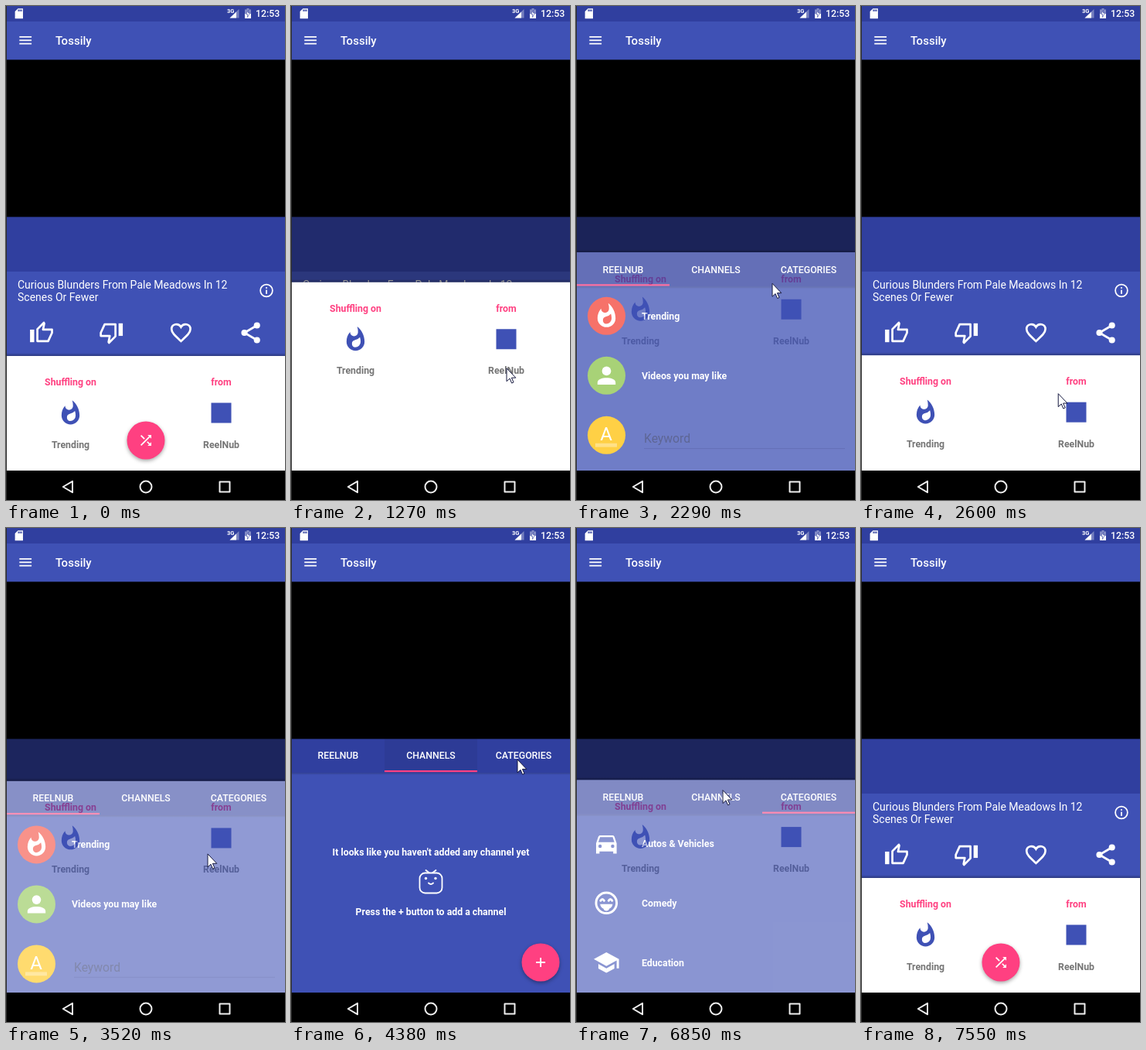
An HTML page for the animation above (8.1 s loop, 361 by 638 pixels).

```html
<!DOCTYPE html>
<html lang="en">
<head>
<meta charset="utf-8">
<title>Shuffle player</title>
<style>
  html, body { margin: 0; width: 100%; height: 100%; overflow: hidden; background: #000; }
  svg { display: block; width: 361px; height: 638px; }
  text { font-family: Roboto, "Noto Sans", sans-serif; font-size: 12.3px; fill: #fff; }
  .bold { font-weight: 700; }
  .medium { font-weight: 500; }
  .mid { text-anchor: middle; }
  .icon { fill: currentColor; fill-rule: evenodd; }
  .line { fill: none; stroke: currentColor; stroke-width: 2; }
  .round { stroke-linecap: round; stroke-linejoin: round; }
  .fab { filter: drop-shadow(0 2px 2.5px rgba(0, 0, 0, .35)); }
</style>
</head>
<body>
<svg id="stage" viewBox="0 0 361 638" xmlns="http://www.w3.org/2000/svg"></svg>
<script>
const INDIGO = '#3f51b5', DEEP = '#303f9f', PINK = '#ff4081';
const LOOP = 8100, TRAVEL = 180;

const rect = (x, y, w, h, fill = 'currentColor', more = '') =>
  `<rect x="${x}" y="${y}" width="${w}" height="${h}" fill="${fill}" ${more}/>`;
const disc = (x, y, r, fill = 'currentColor') => `<circle cx="${x}" cy="${y}" r="${r}" fill="${fill}"/>`;
const ring = (x, y, r) => `<circle class="line" cx="${x}" cy="${y}" r="${r}"/>`;
const shape = d => `<path d="${d}"/>`;
const line = (d, cls = '') => `<path class="line ${cls}" d="${d}"/>`;
const text = (s, x, y, cls = '', style = '') =>
  `<text x="${x}" y="${y}" class="${cls}" style="${style}">${s}</text>`;

// Icons on a 24-unit grid
const icons = {
  menu: [6, 11, 16].map(y => rect(3, y, 18, 2)).join(''),
  card: shape('M10 2H20V22H4V8zM10 4v4h2V4zM13 4v4h2V4zM16 4v4h2V4z'),
  thumb: rect(1, 9, 4, 12) + line('M8 8.6V20H18.3L22 12V9H13.4L14.6 3.2L14.2 2.4z', 'round'),
  heart: line('M12 20C6.5 15 3 12 3 8.5C3 3.6 9.5 2.3 12 6.5C14.5 2.3 21 3.6 21 8.5C21 12 17.5 15 12 20z'),
  share: disc(18, 5, 3) + disc(6, 12, 3) + disc(18, 19, 3) + line('M18 5L6 12L18 19'),
  info: ring(12, 12, 9) + rect(11, 7, 2, 2) + rect(11, 11, 2, 6),
  flame: shape('M13.5.7Q14.3 3.5 14.2 5.5C14.2 10.4 7.2 10.4 7.2 5.5Q4 9 4 14a8 8 0 0 0 16 0C20 8.6 17.4 3.8 13.5.7z' +
    'M11.7 19a3.2 3.2 0 0 1-.4-6.3Q14.4 12 15.9 10.1Q16.5 12 16.5 14.2A4.8 4.8 0 0 1 11.7 19z'),
  shuffle: line('M4.7 4.7l5.2 5.2M4.7 19.3L18.5 5.5M14 14l4.5 4.5') + shape('M14.5 4H20V9.5zM20 14.5V20H14.5z'),
  person: disc(12, 8, 4) + shape('M4 20V18C4 12.7 20 12.7 20 18V20z'),
  car: shape('M6 5h12l1 1l2 6v9h-3v-2H6v2H3v-9l2-6zM5 11h14l-1.500-4.500h-11z') +
    disc(6.5, 14.5, 1.5, INDIGO) + disc(17.5, 14.5, 1.5, INDIGO),
  grin: ring(12, 12, 9) + line('M7 10q1.500-2.500 3 0M14 10q1.500-2.500 3 0', 'round') +
    shape('M6.500 13H17.500Q17 16 14.500 17A2.600 2.600 0 0 1 9.500 17Q7 16 6.500 13z'),
  school: shape('M5 13.200v4L12 21l7-3.800v-4L12 17zM12 3L1 9l11 6 9-4.900V17h2V9z'),
  camera: shape('M3 6H17V10.500l4-4v11l-4-4V18H3z'),
  movie: shape('M2 4h3l2 4h3L8 4h2l2 4h3l-2-4h2l2 4h3l-2-4h4v16H2z'),
  pad: [0, 90, 180, 270].map(a => `<path d="M9 2h6v5.5l-3 3-3-3z" transform="rotate(${a} 12 12)"/>`).join('')
};

const icon = (name, x, y, size, color = '#fff', turn = 0) =>
  `<g class="icon" color="${color}"
    transform="translate(${x} ${y}) rotate(${turn}) scale(${size / 24}) translate(-12 -12)">${icons[name]}</g>`;
const fab = (id, x, y, art) =>
  `<g transform="translate(${x} ${y})"><g id="${id}"><g class="fab">${disc(0, 0, 24.5, PINK)}</g>${art}</g></g>`;
const rowY = i => 82 + 77 * i;

const statusBar = rect(0, 0, 361, 20, DEEP) + icon('card', 16.8, 9.7, 15.5) +
  text('3G', 286, 9, 'bold', 'font-size:7.5px') +
  '<g fill="#fff"><path d="M301.5 4V15.500H289.500z" opacity=".35"/><path d="M298 7.500V15.500H289.500z"/>' +
  '<path d="M309 4.500h2.500V3h3v1.500H317V16h-8z" opacity=".4"/></g>' + rect(309, 10, 8, 6, '#fff') +
  `<path d="M313.500 5.500l-3 5h2v4l3.200-5.500h-2.200z" fill="#fff" stroke="${DEEP}" stroke-width=".6"/>` +
  text('12:53', 323, 14, 'medium');

const toolbar = rect(0, 20, 361, 49.4, INDIGO) + icon('menu', 25.2, 44.3, 21) +
  text('Tossily', 64, 50, 'medium', 'font-size:15px');

const actions = ['thumb', 'thumb', 'heart', 'share']
  .map((name, i) => icon(name, 46 + 90.2 * i, 422, 32.5, '#fff', i === 1 ? 180 : 0)).join('');
const player = rect(0, 272, 361, 71, DEEP) + rect(0, 343, 361, 257, INDIGO) +
  text('Curious Blunders From Pale Meadows In 12', 15, 365, '', 'font-size:14px') +
  text('Scenes Or Fewer', 15, 381.4, '', 'font-size:14px') +
  icon('info', 337, 367.5, 21) + actions;

const column = (x, head, art, name) => text(head, x, 38.3, 'bold mid', 'fill:' + PINK) + art +
  text(name, x, 118.5, 'bold mid', 'fill:#757575');
const collapsed = rect(0, 0, 361, 330, '#fff') +
  column(83.5, 'Shuffling on', icon('flame', 83.5, 73.8, 35, INDIGO), 'Trending') +
  column(278.5, 'from', rect(265.5, 60.5, 26, 26, INDIGO), 'ReelNub');

const rowDisc = (i, color) => disc(39.5, rowY(i), 24.5, color);
const rowText = (i, s) => text(s, 85, rowY(i) + 4.3, 'bold');
const sources = rowDisc(0, '#f44336') + icon('flame', 39.5, rowY(0), 35) + rowText(0, 'Trending') +
  rowDisc(1, '#8bc34a') + icon('person', 39.5, rowY(1), 35) + rowText(1, 'Videos you may like') +
  rowDisc(2, '#ffc107') + text('A', 39, 243, 'mid', 'font-size:24px') + rect(25, 246.5, 28, 4.8, '#fff', 'opacity=".36"') +
  text('Keyword', 88, 246, '', 'font-size:15.7px;fill:#000;fill-opacity:.38') + rect(88, 252.8, 260, 1, DEEP);

const face = '<rect x="166.5" y="173.5" width="29" height="26" rx="7"/><path d="M178.5 173l-4-3M183.500 173l4-3M178 186.500q3 3 6 0"/>';
const channels = text("It looks like you haven't added any channel yet", 181, 151.3, 'bold mid') +
  text('Press the + button to add a channel', 181, 228, 'bold mid') +
  `<g class="line round" color="#fff" style="stroke-width:1.8">${face}</g>` +
  disc(174.5, 180.5, 1.7, '#fff') + disc(187, 180.5, 1.7, '#fff') +
  fab('plus', 323, 289, rect(-6, -1, 12, 2, '#fff') + rect(-1, -6, 2, 12, '#fff'));

const categories = Object.entries({
  car: 'Autos &amp; Vehicles', grin: 'Comedy', school: 'Education',
  camera: 'Entertainment', movie: 'Film &amp; Animation', pad: 'Gaming'
}).map(([art, name], i) => icon(art, 39.3, rowY(i) - .3, 35.5) + rowText(i, name)).join('');

const pages = [sources, channels, `<g id="list">${categories}</g>`]
  .map((page, i) => `<g transform="translate(${360 * i})">${page}</g>`).join('');
const tabs = ['REELNUB', 'CHANNELS', 'CATEGORIES']
  .map((s, i) => text(s, 61 + 120 * i, 26.4, 'medium mid')).join('');
const expanded = rect(0, 0, 361, 330, INDIGO) +
  `<g clip-path="url(#pageClip)"><g id="pages">${pages}</g></g>` +
  rect(0, 44, 361, 3, 'url(#drop)') + rect(0, 0, 361, 44, DEEP) + rect(121, 0, 120, 44, '#000', 'id="ripple"') +
  tabs + rect(1, 41, 120, 2.2, PINK, 'id="marker"');

const navBar = rect(0, 600, 361, 38, '#000') +
  `<g class="line round" color="#eee"><path d="M73.800 621L86 613.800V628.200z"/>
   <circle cx="181" cy="621" r="7.5"/><rect x="276.5" y="614.5" width="13" height="13"/></g>`;

document.getElementById('stage').innerHTML = `
  <defs>
    <clipPath id="pageClip"><rect x="1" y="44" width="360" height="290"/></clipPath>
    <linearGradient id="rise" x2="0" y2="1"><stop stop-opacity="0"/><stop offset="1" stop-opacity=".3"/></linearGradient>
    <linearGradient id="drop" x2="0" y2="1"><stop stop-opacity=".2"/><stop offset="1" stop-opacity="0"/></linearGradient>
  </defs>
  ${player}${rect(0, 272, 361, 328, '#000', 'id="dim"')}
  <g id="sheet">${rect(0, -4, 361, 4, 'url(#rise)')}${collapsed}<g id="expanded">${expanded}</g>
    ${fab('mix', 181, 109, icon('shuffle', 0, 0, 21))}</g>
  ${rect(0, 69, 361, 203.4, '#000')}${statusBar}${toolbar}${navBar}${rect(0, 0, 1, 638, '#2b2b2b')}
  <path id="cursor" d="M0 0V17L4 13.3L6.600 19.300L9 18.200L6.400 12.400H11.800z" fill="#fff" stroke="#15183f"/>`;

const clamp = v => Math.max(0, Math.min(1, v));
const span = (t, from, to) => clamp((t - from) / (to - from));
const pulse = (t, from, to, fade = 150) => span(t, from, from + fade) - span(t, to, to + fade);

// Free pointer moves: start, end, x, y; dragging is added on top
const glides = [
  [230, 980, 279, 563], [1530, 1900, 254, 492], [2520, 2980, 261, 546], [3640, 3830, 186, 479],
  [4130, 4372, 293, 479], [4620, 5050, 175, 704], [6080, 6380, 190, 465], [7160, 7540, 176, 642]
];
const pointer = t => glides.reduce(([px, py], [from, to, x, y]) => {
  const k = span(t, from, to);
  return [px + (x - px) * k, py + (y - py) * k];
}, [298, 642]);

const el = id => document.getElementById(id);
const set = (id, name, value) => el(id).setAttribute(name, value);
const move = (id, x, y) => set(id, 'transform', `translate(${x} ${y})`);
const grow = (id, k) => set(id, 'transform', `scale(${k})`);

function draw(t) {
  const open = span(t, 980, 1530) - span(t, 2183, 2603) + span(t, 3250, 3640) - span(t, 6720, 7160);
  const page = span(t, 4000, 4290) + span(t, 4460, 4750);
  const scroll = 124 * (span(t, 5050, 5400) - span(t, 5400, 5988));
  const [x, y] = pointer(t);

  move('sheet', 0, 452 - TRAVEL * open);
  set('dim', 'opacity', .6 * open);
  set('expanded', 'opacity', clamp((open - .53) * 3.5));
  move('pages', -360 * page, 0);
  move('list', 0, -scroll);
  set('marker', 'x', 1 + 120 * page);
  set('ripple', 'opacity', .06 * pulse(t, 4000, 4450));
  grow('plus', pulse(t, 4100, 4480));
  grow('mix', 1 - pulse(t, 950, 2680) - pulse(t, 3250, 7180));
  move('cursor', x, y - TRAVEL * open - scroll);
}

const start = performance.now();
function tick() {
  draw((performance.now() - start) % LOOP);
  requestAnimationFrame(tick);
}
tick();
</script>
</body>
</html>
```
